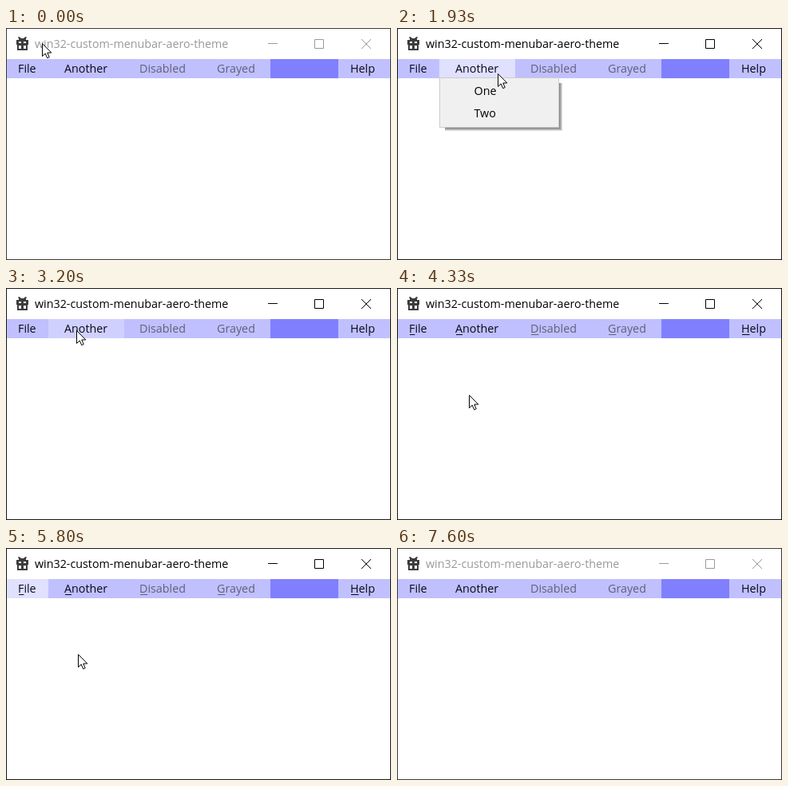
These frames come from a looping animation (482 px wide and 291 px high, 7.79 s). An HTML page with a canvas:

```html
<!DOCTYPE html>
<html lang="en">
<head>
<meta charset="utf-8">
<title>Menu bar</title>
<style>
  html, body { margin: 0; width: 100%; height: 100%; overflow: hidden; background: #fff; }
  canvas { display: block; }
</style>
</head>
<body>
<canvas id="stage" width="482" height="291"></canvas>
<script>
const ctx = document.getElementById('stage').getContext('2d');
const LOOP = 7790, TICK = 1000 / 15;

const ITEMS = [
  { label: 'File', x: 1, end: 53, textX: 15, popup: { w: 147, entries: ['Exit'] } },
  { label: 'Another', x: 53, end: 148, textX: 73, popup: { w: 150, entries: ['One', 'Two'] } },
  { label: 'Disabled', x: 148, end: 245, textX: 167, disabled: true },
  { label: 'Grayed', x: 245, end: 331, textX: 264, disabled: true },
  { label: 'Help', x: 416, end: 481, textX: 431 }
];

// Pointer keys: tick, x, y
const PATH = [
  [0, 45, 19], [2, 45, 19], [3, 44, 21], [8, 44, 21], [15, 30, 57], [22, 30, 57],
  [26, 128, 57], [28, 128, 57], [32, 120, 57], [33, 120, 57], [40, 16, 58],
  [45, 24, 53], [48, 88, 53], [52, 88, 53], [56, 90, 134], [68, 90, 134],
  [69, 90, 133], [104, 90, 133], [113, 90, 300], [117, 90, 300]
];

// Menu states: tick, selected item, popup open, opened by keyboard
const STATES = [
  [0, -1], [15, 0, true], [24, 1, true], [34, -1], [67, 0], [72, 0, true, true],
  [79, 1, true, true], [87, 0], [88, 0, true, true], [97, 0], [105, -1]
];

function rect(color, x, y, w, h) {
  ctx.fillStyle = color;
  ctx.fillRect(x, y, w, h);
}

function text(str, x, y, color) {
  ctx.fillStyle = color;
  ctx.fillText(str, x, y);
}

function pointerAt(tick) {
  const i = PATH.findIndex(key => key[0] > tick);
  const [t0, x0, y0] = PATH[i - 1], [t1, x1, y1] = PATH[i];
  const k = (tick - t0) / (t1 - t0);
  return [Math.round(x0 + (x1 - x0) * k), Math.round(y0 + (y1 - y0) * k)];
}

function drawTitleBar(active) {
  const color = active ? '#000' : '#999';
  const dark = '#3c3c3c';
  // Gift box icon
  rect(dark, 13, 15, 15, 6);
  rect(dark, 14, 20, 13, 8);
  for (const x of [16, 22]) {
    rect('#fff', x, 17, 3, 2);
    rect('#fff', x, 22, 3, 4);
  }
  ctx.strokeStyle = dark;
  ctx.lineWidth = 2;
  ctx.stroke(new Path2D('M20.5 15L15.5 11.5M20.5 15L25.5 11.5M16 14H25'));

  text('win32-custom-menubar-aero-theme', 36, 25, color);
  ctx.strokeStyle = color;
  ctx.lineWidth = 1;
  ctx.stroke(new Path2D('M328 19.5H340M386.5 14.5H397.5V25.5H386.5ZM445 14L457 26M457 14L445 26'));
}

function drawMenuBar(selected, hot, underlined) {
  rect('#8080ff', 1, 39, 480, 24);
  ITEMS.forEach((item, i) => {
    const back = i === selected ? '#e0e0ff' : i === hot ? '#d0d0ff' : '#c0c0ff';
    const color = item.disabled ? '#60607a' : '#08081c';
    rect(back, item.x, 39, item.end - item.x, 24);
    text(item.label, item.textX, 56, color);
    if (underlined) rect(color, item.textX + 1, 58, ctx.measureText(item.label[0]).width - 1, 1);
  });
}

function drawPopup({ x, popup: { w, entries } }, alpha, keyboard) {
  const y = 62, h = 7 + 28 * entries.length;
  for (let i = 4; i > 0; i--) rect('rgba(0,0,0,.14)', x + 7, y + 7, w - 7 + i, h - 7 + i);
  rect('#fff', x, y + 1, w, h - 1);
  ctx.globalAlpha = alpha;
  rect('#ccc', x, y, w, h);
  rect('#f0f0f0', x + 1, y + 1, w - 2, h - 2);
  if (keyboard) rect('#91c9f7', x + 3, y + 3, w - 6, 28);
  entries.forEach((entry, i) => text(entry, x + 43.5, 84 + 28 * i, '#000'));
  ctx.globalAlpha = 1;
}

const ARROW = new Path2D('M.5.5V16.5L4.2 13L6.7 18.7L9.2 17.6L6.8 12H11.8Z');

function drawPointer(x, y) {
  ctx.save();
  ctx.translate(x, y);
  ctx.fillStyle = '#fff';
  ctx.strokeStyle = '#000';
  ctx.lineWidth = 1;
  ctx.fill(ARROW);
  ctx.stroke(ARROW);
  ctx.restore();
}

function draw(ms) {
  const tick = Math.min(116, Math.floor((ms + 5) / TICK));
  const active = tick >= 6 && tick < 114;
  const [px, py] = pointerAt(tick);
  const [, selected, open, keyboard] = STATES.filter(s => s[0] <= tick).pop();
  const overBar = py >= 39 && py < 63 && selected < 0;
  const hot = overBar ? ITEMS.findIndex(m => !m.disabled && px >= m.x && px < m.end) : -1;

  ctx.font = '14.3px "Open Sans", "Noto Sans", sans-serif';
  rect(active ? '#181818' : '#3a3a3a', 0, 0, 482, 291);
  rect('#fff', 1, 1, 480, 289);
  drawTitleBar(active);
  drawMenuBar(selected, hot, tick >= 65 && tick < 105);
  if (open) drawPopup(ITEMS[selected], Math.min(1, 0.22 + (tick - 15) * 0.39), keyboard);
  drawPointer(px, py);
}

function frame() {
  draw(performance.now() % LOOP);
  requestAnimationFrame(frame);
}
frame();
</script>
</body>
</html>
```
